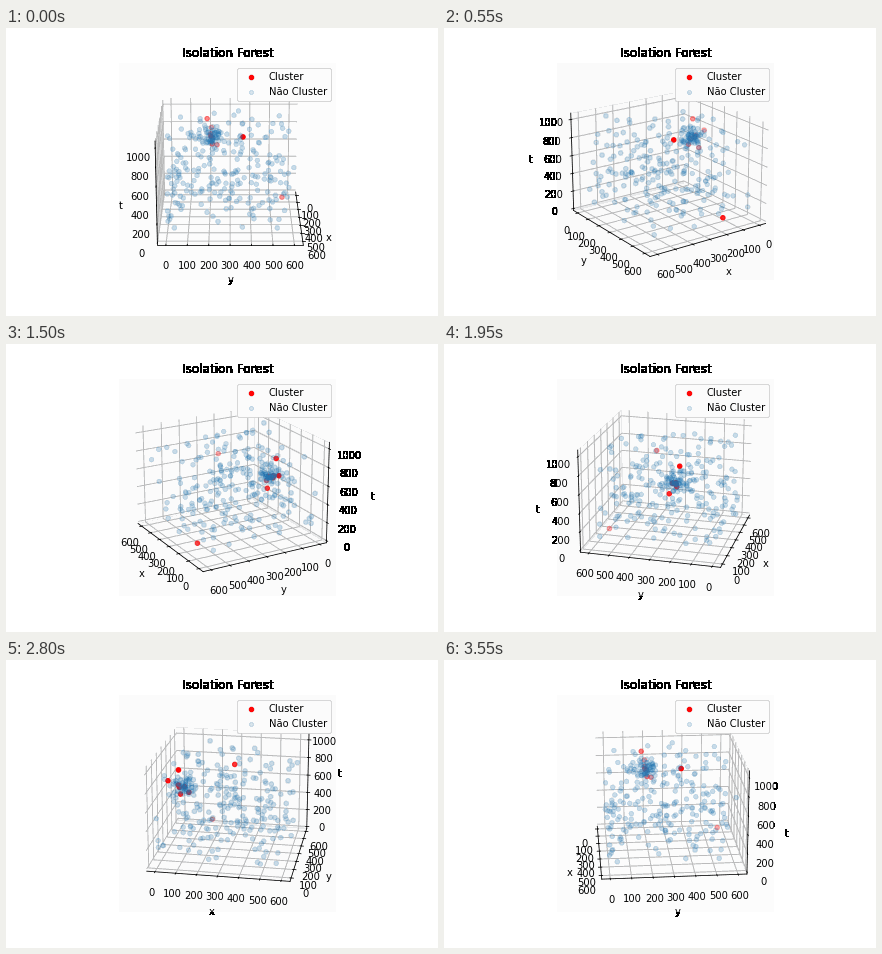
Animation of 432x288 px, one loop 3.6 s. Source, as a matplotlib script:

```python
import numpy as np
import matplotlib.pyplot as plt
from matplotlib.animation import FuncAnimation
from mpl_toolkits.mplot3d import Axes3D

FRAMES = 72
INTERVAL = 50
ELEVATION = 20
CENTER = np.array([88, 204, 722])


def flatten(img, dpi):
    """Average similar colours and make every painted pixel opaque."""
    rgba = np.round(img * 255).astype(int)
    r, g, b, a = np.moveaxis(rgba, -1, 0)
    key = ((r >> 5) << 10 | (g >> 4) << 6 | (b >> 5) << 3 | a >> 5).ravel()
    count = np.maximum(np.bincount(key), 1)
    out = np.zeros(rgba.shape, np.uint8)
    for c in range(3):
        mean = np.bincount(key, weights=rgba[..., c].ravel()) / count
        out[..., c] = np.round(mean)[key].reshape(a.shape)
    out[..., 3] = np.where(a > 0, 255, 0)
    return out, 0, 0


class FlatAxes(Axes3D):
    """3D axes painted on a clear layer with hard outer edges."""

    def draw(self, renderer):
        renderer.start_filter()
        super().draw(renderer)
        renderer.stop_filter(flatten)


def padded(low, high):
    pad = (high - low) / 48
    return low - pad, high + pad


def make_points(rng):
    """Return the red and the blue points as rows of x, y, t."""
    spread = rng.uniform((0, 0, 45), (600, 600, 1000), (225, 3))
    dense = rng.normal(CENTER, (29, 29, 55), (58, 3))
    inner = rng.normal(CENTER, (14, 14, 35), (4, 3))
    outer = [(312, 362, 876), (162, 561, 84), (71, 185, 910),
             (14, 205, 772), (68, 234, 612)]
    return np.vstack([outer, inner]), np.vstack([spread, dense])


red, blue = make_points(np.random.default_rng(5))

fig = plt.figure(figsize=(6, 4), dpi=72, facecolor="white")
fig.subplots_adjust(left=0.125, right=0.9, bottom=0.125, top=0.88)
ax = fig.add_subplot(axes_class=FlatAxes)

ax.scatter(*red.T, s=20, c="r", label="Cluster")
ax.scatter(*blue.T, s=20, c="tab:blue", alpha=0.2, label="Não Cluster")

side = padded(-26, 628)
ax.set(xlabel="x", ylabel="y", zlabel="t", title="Isolation Forest",
       xlim=side, ylim=side, zlim=padded(-2, 1048),
       xticks=range(0, 601, 100), yticks=range(0, 601, 100),
       zticks=range(0, 1001, 200))
ax.legend(loc="upper right")


def update(i):
    ax.view_init(elev=ELEVATION, azim=i * 360 / FRAMES)
    return ()


anim = FuncAnimation(fig, update, frames=FRAMES, interval=INTERVAL,
                     repeat=True, repeat_delay=0)
plt.show()
```
